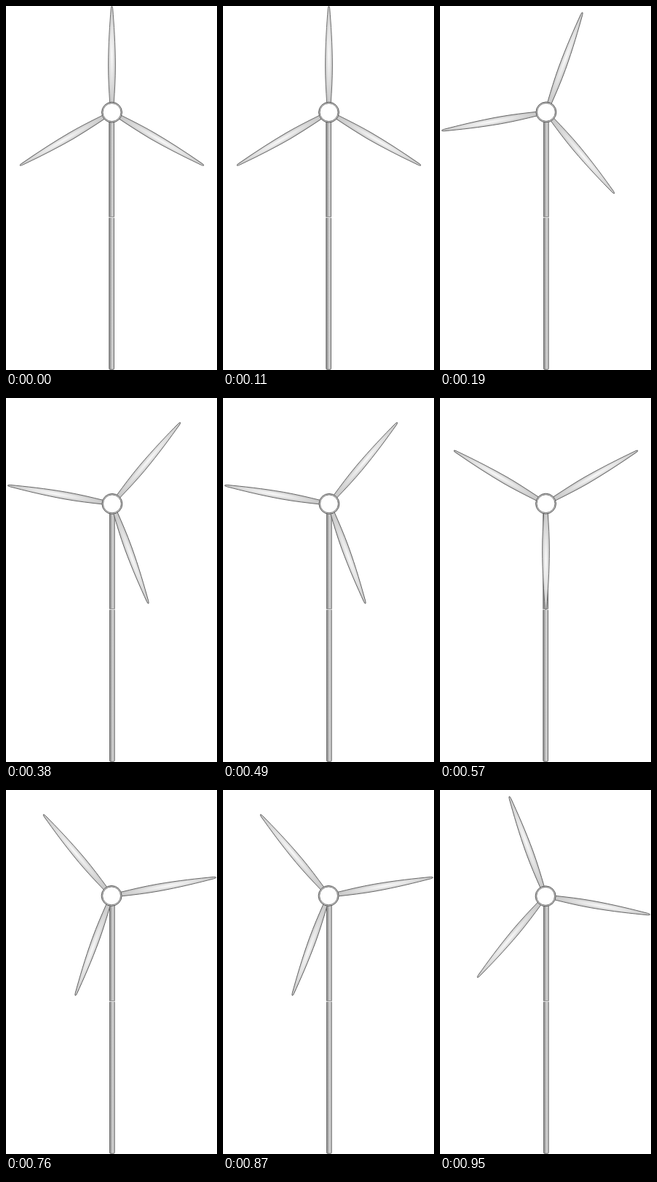
Animation of 290 by 500 pixels, one loop 1140 ms. Source, as an HTML page:

```html
<!DOCTYPE html>
<html lang="en">
<head>
<meta charset="utf-8">
<title>Wind turbine</title>
<style>
  html, body { margin: 0; width: 100%; height: 100%; overflow: hidden; background: #fff; }
  svg { display: block; width: 100vw; height: 100vh; }
</style>
</head>
<body>
<svg viewBox="0 0 290 500">
  <defs>
    <linearGradient id="steel">
      <stop offset="0" stop-color="#858585"/>
      <stop offset=".3" stop-color="#a8a8a8"/>
      <stop offset=".65" stop-color="#d6d6d6"/>
      <stop offset="1" stop-color="#b8b8b8"/>
    </linearGradient>
    <radialGradient id="shine">
      <stop offset="0" stop-color="#fafafa"/>
      <stop offset=".5" stop-color="#e4e4e4"/>
      <stop offset="1" stop-color="#c8c8c8"/>
    </radialGradient>
    <path id="blade" d="M-2.8-13 C-3.9-30-4.9-46-4.9-64 C-4.8-94-2.8-122-1.2-142.5 Q-.8-145.8 0-145.8 Q.8-145.8 1.2-142.5 C2.8-122 4.8-94 4.9-64 C4.9-46 3.9-30 2.8-13 Z"
      fill="url(#shine)" stroke="#626262" stroke-width=".9"/>
  </defs>
  <rect width="290" height="500" fill="#fff"/>
  <g id="tower" fill="url(#steel)" stroke="#686868" stroke-width=".95">
    <rect x="142.4" y="150" width="6.7" height="140"/>
    <rect x="142.4" y="290" width="6.7" height="209.3" rx="1.4"/>
    <path d="M141.8 290.3h7.9" stroke="#f0f0f0" stroke-width="1"/>
  </g>
  <g id="head">
    <g id="rotor">
      <use href="#blade"/>
      <use href="#blade" transform="rotate(120)"/>
      <use href="#blade" transform="rotate(240)"/>
    </g>
    <circle r="14" fill="#d2d2d2" stroke="#5a5a5a" stroke-width="1"/>
    <circle r="12.4" fill="#fff" stroke="#686868" stroke-width=".85"/>
  </g>
</svg>
<script>
  const STEP_MS = 190, STEPS = 6, STEP_DEG = 20;
  const CX = 145.5, CY = 145.6, WOBBLE = 0.45;
  const [tower, head, rotor] = ['tower', 'head', 'rotor'].map(id => document.getElementById(id));
  const move = (el, x, y) => el.setAttribute('transform', `translate(${x} ${y})`);

  function draw(ms) {
    const step = Math.floor(ms / STEP_MS) % STEPS;
    const phase = step / STEPS * 2 * Math.PI;
    rotor.setAttribute('transform', `rotate(${step * STEP_DEG})`);
    // The hub runs slightly out of true, once round per loop.
    move(head, CX + WOBBLE * Math.sin(phase), CY + WOBBLE * Math.cos(phase));
    // The tower sways slightly when a blade lines up with it.
    move(tower, step % 3 ? 0.1 : -0.6, 0);
  }

  const start = performance.now();
  function tick() {
    draw(performance.now() - start);
    requestAnimationFrame(tick);
  }
  tick();
</script>
</body>
</html>
```
